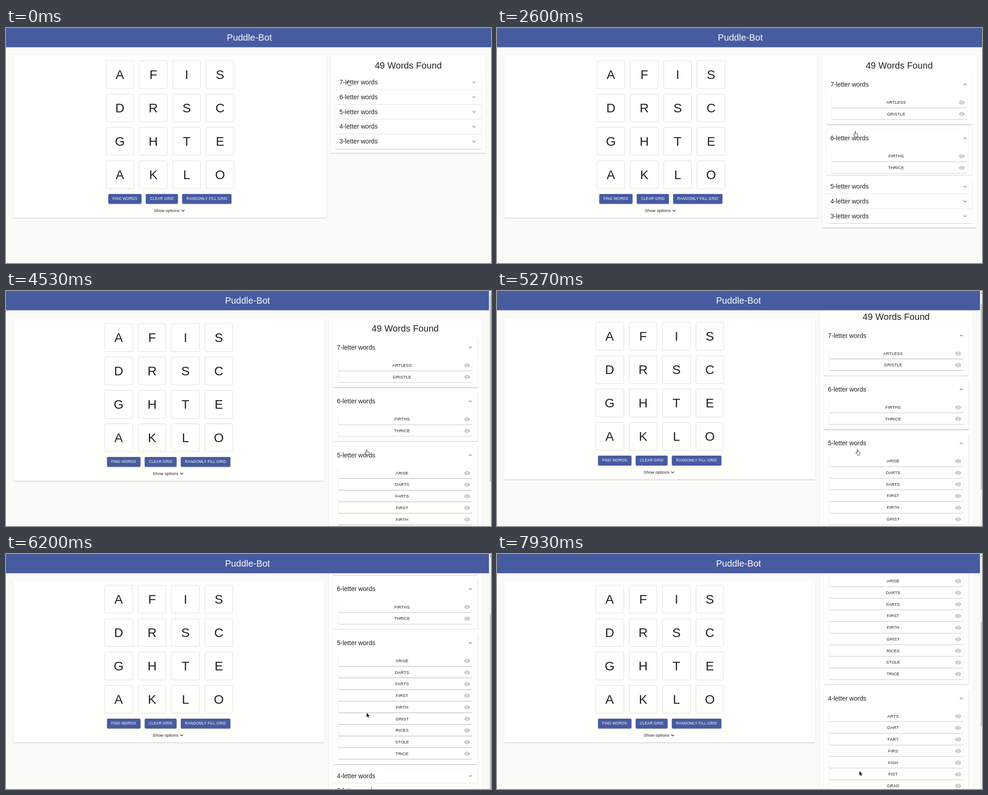
Write an HTML page that moves like this. It is 1076 px wide and 521 px high and loops after 8000 ms.

```html
<!DOCTYPE html>
<html lang="en">
<head>
<meta charset="utf-8">
<title>Puddle-Bot</title>
<style>
  html, body { margin: 0; width: 100%; height: 100%; overflow: hidden; background: #fafaf7; }
  #view { position: relative; width: 100%; height: 100%; overflow: hidden; contain: strict; }
  #stage {
    position: absolute; left: 0; top: 0; width: 1846px; height: 892px; overflow: hidden;
    transform: scale(.585); transform-origin: 0 0; background: #fafaf7; color: #212121;
    font: 16px/24px "Liberation Sans", Arial, sans-serif; letter-spacing: .00938em; white-space: nowrap;
  }
  #stage div { position: absolute; box-sizing: border-box; }
  #stage .paper {
    background: #fffffc; border-radius: 4px;
    box-shadow: 0 2px 1px -1px rgba(0,0,0,.2), 0 1px 1px rgba(0,0,0,.14), 0 1px 3px rgba(0,0,0,.12);
  }
  #stage .big { font-size: 34px; line-height: 42px; letter-spacing: .00735em; text-align: center; }
  #header { left: 0; top: 0; height: 73px; padding-top: 15px; background: #475ba1; color: #fff; }
  #board { left: 27px; height: 615px; }
  #grid { left: 50%; top: 18px; margin-left: -243px; }
  #grid div {
    width: 106.6px; height: 106.6px; border: 1px solid #c2c2c0; border-radius: 4px;
    font-size: 48px; line-height: 105px; letter-spacing: 0; text-align: center;
  }
  #buttons { left: 0; right: 0; top: 524px; display: flex; justify-content: center; gap: 16px; }
  #buttons span {
    padding: 0 16px; border-radius: 4px; background: #475ba1; color: #fff;
    font-size: 14px; line-height: 36.5px; letter-spacing: .02857em;
    box-shadow: 0 3px 1px -2px rgba(0,0,0,.2), 0 2px 2px rgba(0,0,0,.14), 0 1px 5px rgba(0,0,0,.12);
  }
  #options { left: 0; right: 0; top: 575px; display: flex; justify-content: center; }
  #found { left: 0; right: 0; top: 16px; }
  #results .group { left: 16px; right: 16px; border-radius: 0; }
  #results .group:nth-child(2) { border-radius: 4px 4px 0 0; }
  #results .group:last-child { border-radius: 0 0 4px 4px; }
  .rule { left: 0; right: 0; top: -1px; height: 1px; background: #e0e0dd; }
  .group:nth-child(2) .rule { display: none; }
  .head { left: 16px; right: 16px; top: 0; font-size: 24px; letter-spacing: 0; }
  .head svg { position: absolute; right: 0; top: 50%; margin-top: -12px; color: #757573; }
  .list { left: 0; right: 0; overflow: hidden; }
  .row { left: 20px; right: 20px; height: 40px; padding: 8px 32px 8px 8px; text-align: center; }
  .row svg { position: absolute; right: 8px; top: 8px; color: #bdbdbb; }
  #bar { right: 0; top: 0; width: 14px; height: 100%; background: #f1f1ef; }
  #thumb { left: 3px; width: 10px; background: #c1c1bf; }
  #arrow { left: 3px; top: 5px; border: 4px solid transparent; border-top: 0; border-bottom: 5px solid; }
  #cursor { position: absolute; left: 0; top: 0; overflow: visible; }
</style>
</head>
<body>
<div id="view">
  <div id="stage">
    <div id="results" class="paper"><div id="found" class="big">49 Words Found</div></div>
    <div id="board" class="paper">
      <div id="grid"></div>
      <div id="buttons"><span>FIND WORDS</span><span>CLEAR GRID</span><span>RANDOMLY FILL GRID</span></div>
      <div id="options">Show options</div>
    </div>
    <div id="header" class="big">Puddle-Bot</div>
    <div id="bar"><div id="arrow"></div><div id="thumb"></div></div>
  </div>
  <svg id="cursor" width="1" height="1">
    <path id="hand" fill="#fff" stroke="#222" stroke-width=".9" stroke-linejoin="round"
      d="M-1 6.7V.9q0-1 .9-1t.9 1V4.4q1.2-.6 1.6.4 1.2-.5 1.6.5 1.5-.2 1.5 1.2V8.7q0 1.4-1 2.6V12.3H-.2V11.3L-3.7 7.6q-.5-1 .3-1.4.9-.2 2.4 1.3z"/>
    <path id="pointer" fill="#111" d="M0 0V9.6L2.2 7.6 3.8 11.1 5.2 10.4 3.7 7.1H6.8z"/>
  </svg>
</div>
<script>
const LOOP = 8000, FRAME = 1000 / 15, SCALE = .585;
const WIDTH = 1846, VIEW = 955, TRACK = 923, BAR = 14;
const TOP = 105, STICKY = 100, GAP = 16, ROW = 44, PITCH = 126.6;

const $ = id => document.getElementById(id);
const icon = d => `<svg width="24" height="24" viewBox="0 0 24 24" fill="currentColor"><path d="${d}"/></svg>`;
const CHEVRON = icon("M16.59 8.59L12 13.17 7.41 8.59 6 10l6 6 6-6z");
const EYE = icon("M12 4.5C7 4.5 2.73 7.61 1 12c1.73 4.39 6 7.5 11 7.5s9.27-3.11 11-7.5c-1.73-4.39-6-7.5-11-7.5z" +
  "M12 17c-2.76 0-5-2.24-5-5s2.24-5 5-5 5 2.24 5 5-2.24 5-5 5zm0-8c-1.66 0-3 1.34-3 3s1.34 3 3 3 3-1.34 3-3-1.34-3-3-3z");

// size: letters per word, open: tick of the click, rows: list length
const groups = [
  { size: 7, open: 10, rows: 2, words: "ARTLESS GRISTLE" },
  { size: 6, open: 37, rows: 2, words: "FIRTHS THRICE" },
  { size: 5, open: 64, rows: 9, words: "ARISE DARTS FARTS FIRST FIRTH GRIST RICES STOLE TRICE" },
  { size: 4, open: 106, rows: 21, words: "ARTS DART FART FIRS FISH FIST GRAD" },
  { size: 3, open: Infinity, rows: 0, words: "" }
];

// Each move eases from the place before it: start tick, end tick, goal
const scrolls = [
  { from: 76, to: 84, goal: [212] },
  { from: 87, to: 90, goal: [285] },
  { from: 112, to: 119, goal: [587] }
];
const moves = [
  { from: 9, to: 10, goal: [759.5, 117.5] },
  { from: 22, to: 26, goal: [787, 197] },
  { from: 27, to: 31, goal: [795, 229.5] },
  { from: 47, to: 48, goal: [795, 235] },
  { from: 50, to: 59, goal: [800, 351.5] },
  { from: 92, to: 101, goal: [803, 468] },
  { from: 102, to: 103, goal: [804, 481.5] },
  { from: 116, to: 117, goal: [804, 481.5] }
];

const inOut = p => p < .5 ? 4 * p ** 3 : 1 - 4 * (1 - p) ** 3;

function glide(list, place, tick) {
  for (const { from, to, goal } of list) {
    if (tick <= from) break;
    const p = inOut(Math.min(1, (tick - from) / (to - from)));
    place = place.map((v, i) => v + (goal[i] - v) * p);
  }
  return place;
}
const scrollAt = tick => Math.round(glide(scrolls, [0], tick)[0]);
const cursorAt = tick => glide(moves, [760, 115.5], tick);

// cubic-bezier(.4, 0, .2, 1)
function ease(x) {
  if (x <= 0) return 0;
  if (x >= 1) return 1;
  let lo = 0, hi = 1, u;
  for (let i = 0; i < 24; i++) {
    u = (lo + hi) / 2;
    const bx = 1.2 * u * (1 - u) ** 2 + .6 * u * u * (1 - u) + u ** 3;
    if (bx < x) lo = u; else hi = u;
  }
  return 3 * u * u * (1 - u) + u ** 3;
}

function add(parent, cls, html = "") {
  const el = document.createElement("div");
  el.className = cls;
  el.innerHTML = html;
  parent.append(el);
  return el;
}

function place(el, box) {
  for (const side in box) el.style[side] = box[side] + "px";
}

[..."AFISDRSCGHTEAKLO"].forEach((c, i) => {
  place(add($("grid"), "", c), { left: i % 4 * PITCH, top: Math.floor(i / 4) * PITCH });
});
$("options").innerHTML += CHEVRON;

for (const g of groups) {
  g.el = add($("results"), "group paper");
  g.rule = add(g.el, "rule");
  g.head = add(g.el, "head", g.size + "-letter words" + CHEVRON);
  g.list = add(g.el, "list");
  g.words.split(" ").filter(Boolean).forEach((w, i) => {
    place(add(g.list, "row paper", w + EYE), { top: 12 + ROW * i });
  });
  g.full = g.rows && 28 + ROW * g.rows;
  const c = g.full / 36;
  g.time = (4 + 15 * c ** .25 + c / 5) * 10;
}

// Page position and opening of every group
function layout(tick) {
  let y = 178, before = 0;
  return groups.map((g, i) => {
    const ms = tick < g.open ? 0 : (tick - g.open) * FRAME + 20;
    const lift = ease(ms / 150), body = g.full * ease(ms / g.time);
    const spread = i ? Math.max(lift, before) : 0;
    const top = y + GAP * spread, head = 56 + GAP * lift;
    y = top + head + body;
    before = lift;
    return { top, head, body, lift, spread, bottom: y };
  });
}

// The pointer shape is refreshed only while the mouse moves
function hovers(tick) {
  const last = moves.filter(m => m.from < tick).pop();
  const seen = last ? Math.min(tick, last.to) : tick;
  const y = cursorAt(seen)[1] / SCALE + scrollAt(seen);
  return layout(seen).some(b => y >= b.top && y < b.top + b.head);
}

function draw(t) {
  const tick = Math.floor((t + 5) / FRAME);
  const scroll = scrollAt(tick), boxes = layout(tick);

  boxes.forEach((b, i) => {
    const g = groups[i];
    place(g.el, { top: b.top - TOP, height: b.head + b.body });
    place(g.head, { height: b.head, lineHeight: b.head });
    place(g.list, { top: b.head, height: b.body });
    g.rule.style.opacity = 1 - b.spread;
    g.head.lastChild.style.transform = `rotate(${180 * b.lift}deg)`;
  });

  const bottom = boxes[boxes.length - 1].bottom + GAP, page = bottom + 29;
  const long = page > VIEW, width = WIDTH - (long ? BAR : 0);
  const columns = width - 38, split = 19 + columns * 2 / 3;
  place($("header"), { width });
  place($("board"), { width: split - 35, top: Math.max(TOP - scroll, STICKY) });
  place($("results"), { left: split + 8, width: columns / 3 - 16, top: TOP - scroll, height: bottom - TOP });

  $("bar").style.display = long ? "" : "none";
  place($("thumb"), { top: 16 + TRACK * scroll / page, height: TRACK * VIEW / page });
  $("arrow").style.borderBottomColor = scroll ? "#505050" : "#a3a3a3";

  const [x, y] = cursorAt(tick), over = hovers(tick);
  $("cursor").style.transform = `translate(${x}px, ${y}px)`;
  $("hand").style.display = over ? "" : "none";
  $("pointer").style.display = over ? "none" : "";
}

const start = performance.now();
function loop() {
  draw((performance.now() - start) % LOOP);
  requestAnimationFrame(loop);
}
loop();
</script>
</body>
</html>
```
